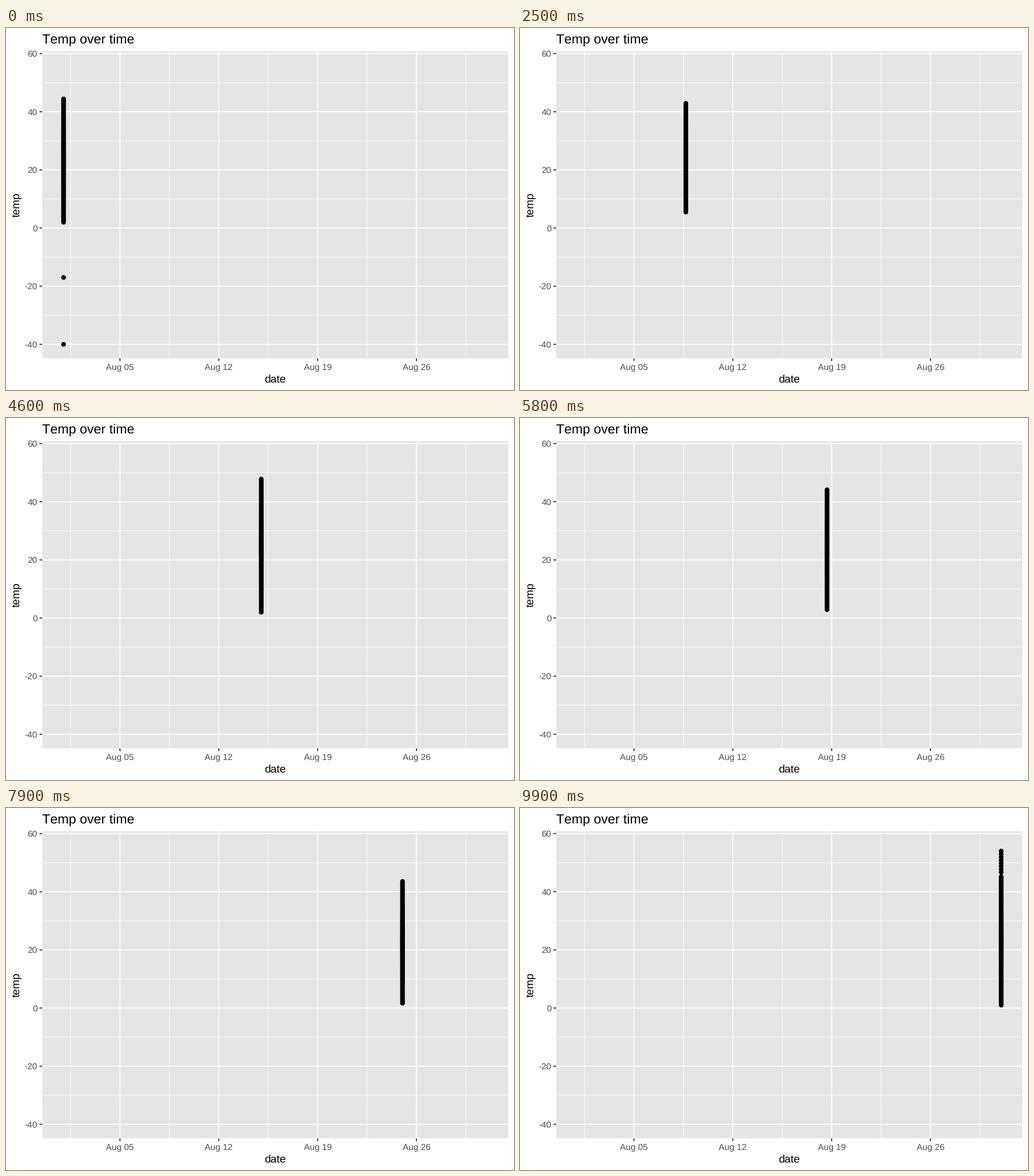
Animation of 885x632 px, one loop 10000 ms. Source, as a matplotlib script:

```python
import numpy as np
import matplotlib.pyplot as plt
from matplotlib.animation import FuncAnimation
from matplotlib.patches import Rectangle

W, H, DPI = 885, 632, 64
FRAMES, LAST_DAY = 100, 30
LEFT, RIGHT, TOP, BOTTOM = 63.2, 875, 40.6, 576.7
DOT = 8.2
CENTRE = 25

plt.rcParams.update({"font.family": "Liberation Sans", "text.hinting": "none",
                     "text.kerning_factor": 6})


def pt(px):
    return px * 72 / DPI


def day_x(day):
    return 100.1 + 24.6 * day


def temp_y(temp):
    return 349.25 - 5.076 * np.asarray(temp)


def spread(lo, hi, n, a):
    """Values from lo to hi, denser in the middle as a grows."""
    s = np.linspace(0, 1, n)
    return lo + (hi - lo) * (s + a * np.sin(2 * np.pi * s) / (2 * np.pi))


# Key points of the daily minimum and maximum
KEY_DAYS = [0, 4.25, 10.67, 14, 21.5, 26.67, 30]
KEY_LOW = [2, 2.5, 5.5, 2, 0.7, 2.7, 1]
KEY_HIGH = [44.4, 46.9, 42, 47.8, 43.4, 43.7, 45.2]

# Stray readings: day, first, last, count
STRAYS = [(0, -40, -17, 2), (6, -17, -17, 1), (11, -17, -17, 1),
          (25, 47, 56, 6), (30, 46.7, 54, 8)]

rng = np.random.default_rng(4)
rest_low = rng.uniform(-3, 4, LAST_DAY + 1)
rest_high = rng.uniform(31, 35, LAST_DAY + 1)

day_frame = np.round(1 + np.arange(LAST_DAY + 1) * (FRAMES - 1) / LAST_DAY) - 1

fig = plt.figure(figsize=(W / DPI, H / DPI), dpi=DPI, facecolor="white")
ax = fig.add_axes([0, 0, 1, 1])
ax.set(xlim=(0, W), ylim=(H, 0))
ax.axis("off")


def line(xs, ys, width, color="white", z=1):
    ax.plot(xs, ys, color=color, lw=pt(width), zorder=z, snap=False,
            solid_capstyle="butt")


def label(x, y, s, px, color="black", ha="center", **kw):
    ax.text(x, y, s, fontsize=pt(px), color=color, ha=ha, va="baseline", **kw)


ax.add_patch(Rectangle((LEFT, TOP), RIGHT - LEFT, BOTTOM - TOP,
                       fc="#E5E5E5", ec="none", snap=False, zorder=0))
for d in np.arange(0.5, 30, 7):
    line([day_x(d)] * 2, [TOP, BOTTOM], 0.95)
for temp in range(-30, 51, 20):
    line([LEFT, RIGHT], [temp_y(temp)] * 2, 0.95)
for d in range(4, 26, 7):
    x = day_x(d)
    line([x, x], [TOP, BOTTOM], 1.87, z=2)
    line([x, x], [BOTTOM, BOTTOM + 4.8], 1.87, "#333333")
    label(x, 596.8, f"Aug {d + 1:02d}", 15.4, "#4D4D4D")
for temp in range(-40, 61, 20):
    y = temp_y(temp)
    line([LEFT, RIGHT], [y, y], 1.87, z=2)
    line([LEFT - 4.8, LEFT], [y, y], 1.87, "#333333")
    label(54.5, y + 5.5, str(temp), 15.4, "#4D4D4D", "right")
label(63.4, 26.8, "Temp over time", 23.1, ha="left")
label(469.1, 619, "date", 19.25)
label(23.6, 308.7, "temp", 19.25, rotation=90, rotation_mode="anchor")

dots = ax.scatter([], [], color="black", linewidths=0, zorder=3)


def update(n):
    t = np.interp(n, day_frame, np.arange(LAST_DAY + 1))
    d, f = int(t), t % 1

    # The range narrows a little between two days
    lo = np.interp(t, KEY_DAYS, KEY_LOW)
    hi = np.interp(t, KEY_DAYS, KEY_HIGH)
    mid = (lo + hi) / 2
    half = (hi - lo) / 2 * (1 - 0.08 * np.sin(np.pi * f))
    groups = [(t, spread(mid - half, mid + half, 110, 0.3))]

    # Strays leave and rejoin the main column within one day
    for day, first, last, count in STRAYS:
        weight = 1 - abs(t - day)
        if weight > 0:
            v = np.linspace(first, last, count)
            groups.append((t, weight * v + (1 - weight) * CENTRE))

    # Readings with no match on the next day stay behind until it comes
    if f > 0 and (d + 3) % 12 < 7:
        groups.append((d, spread(rest_low[d], rest_high[d], 48, 0.3)))

    xs = np.concatenate([np.full(len(v), day_x(x)) for x, v in groups]) + 0.2
    ys = temp_y(np.concatenate([v for _, v in groups]))
    dots.set_offsets(np.column_stack([xs, ys]))
    dots.set_sizes(np.full(len(xs), pt(DOT) ** 2), DPI)
    return (dots,)


anim = FuncAnimation(fig, update, frames=FRAMES, interval=100, repeat=True,
                     repeat_delay=0, init_func=lambda: update(0), blit=False)
plt.show()
```
